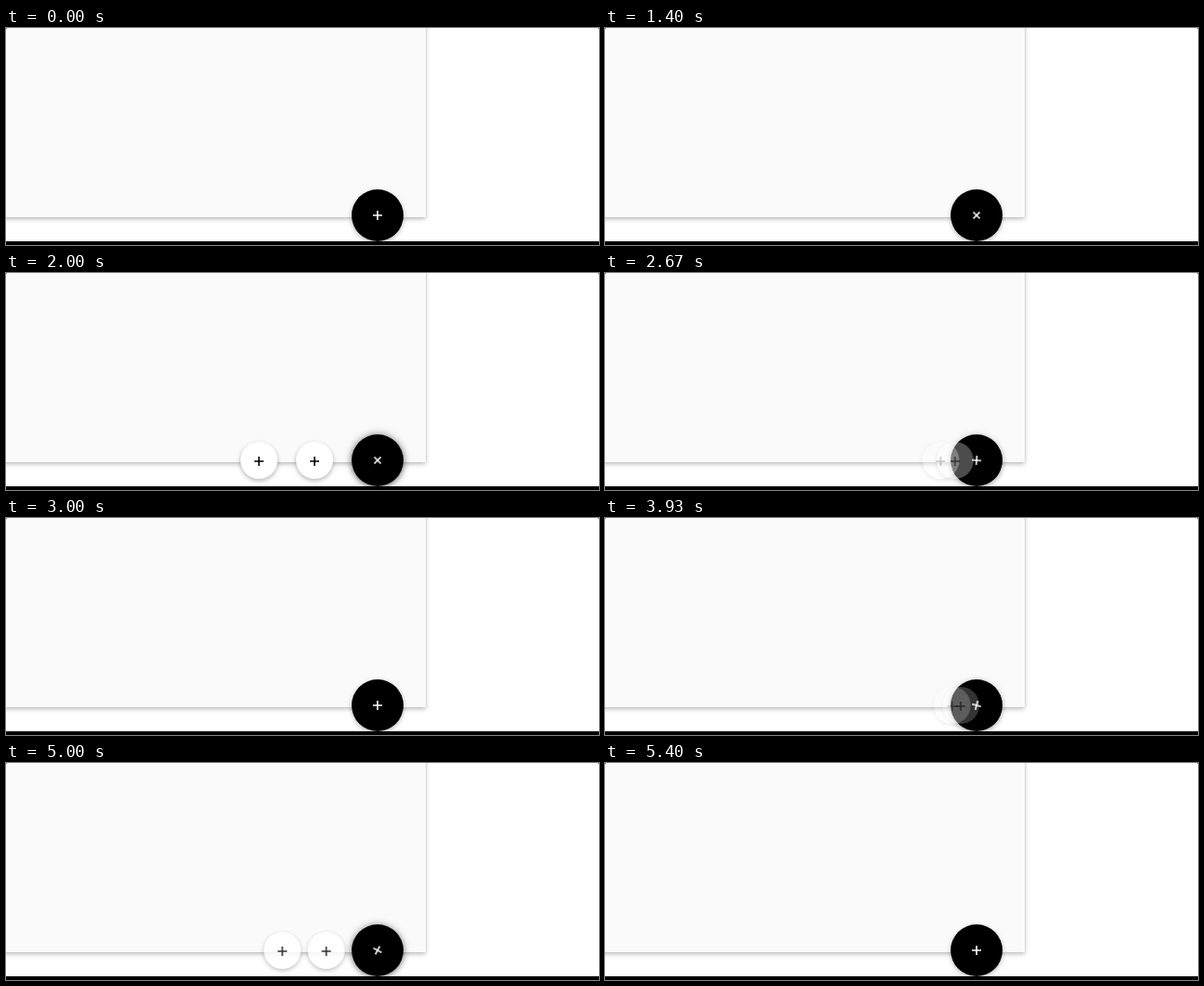
Recreate the animation shown at these times as an HTML page. Size 640 by 234 pixels, loop 6.59 s.

```html
<!DOCTYPE html>
<html lang="en">
<head>
<meta charset="utf-8">
<title>Speed dial</title>
<style>
  html, body { margin: 0; width: 100%; height: 100%; overflow: hidden; background: #fff; }
  .stage { position: absolute; left: 0; top: 0; width: 640px; height: 234px; overflow: hidden; background: #fff; }
  .stage * { position: absolute; }
  .panel { left: -10px; top: -10px; width: 463px; height: 214px; background: #fafafa;
    box-shadow: 0 2px 5px rgba(0, 0, 0, .26), 0 0 1px rgba(0, 0, 0, .2); }
  .floor { left: 0; top: 230px; width: 640px; height: 4px; background: #000; }
  .corner { top: 0; width: 2px; height: 2px; }
  .corner.l { left: 0; background: radial-gradient(circle at 100% 100%, transparent 1.8px, #000 2.4px); }
  .corner.r { right: 0; background: radial-gradient(circle at 0 100%, transparent 1.8px, #000 2.4px); }
  .fab, .halo { left: 373px; top: 174px; width: 56px; height: 56px; border-radius: 50%; }
  .fab { background: #000; box-shadow: 0 2px 5px rgba(0, 0, 0, .26); }
  .halo { box-shadow: 0 0 8px rgba(0, 0, 0, .45); opacity: 0; }
  .mini { top: 182px; width: 40px; height: 40px; border-radius: 50%; background: #fff;
    box-shadow: 0 2px 5px rgba(0, 0, 0, .3); opacity: 0; }
  .near { left: 313px; }
  .far { left: 253px; }
  svg { left: 50%; top: 50%; width: 16px; height: 16px; margin: -8px; }
  .mini svg { margin-top: -7px; }
  path { fill: none; stroke: #000; stroke-width: 1.6; }
  .fab path { stroke: #fff; }
</style>
</head>
<body>
<div class="stage">
  <div class="panel"></div>
  <div class="halo"></div>
  <div class="fab"><svg class="icon" viewBox="-8 -8 16 16"><path d="M-5 0H5M0-5V5"/></svg></div>
  <div class="mini far"><svg viewBox="-8 -8 16 16"><path d="M-5 0H5M0-5V5"/></svg></div>
  <div class="mini near"><svg viewBox="-8 -8 16 16"><path d="M-5 0H5M0-5V5"/></svg></div>
  <div class="floor"></div>
  <div class="corner l"></div>
  <div class="corner r"></div>
</div>
<script>
  const LOOP = 6590;
  const EASE_OUT = 'cubic-bezier(.25,.46,.45,.94)';

  // Each row: start, end, open after the move, easing
  const dialMoves = [
    [1450, 1950, true, EASE_OUT],
    [2485, 2935, false, 'ease'],
    [3875, 4375, true, EASE_OUT],
    [4930, 5380, false, 'ease']
  ];
  const iconMoves = [
    [1399, 1399, true, 'linear'],
    [2485, 2785, false, 'ease'],
    [3875, 4175, true, EASE_OUT],
    [4930, 5230, false, 'ease']
  ];

  function timeline(selector, moves, closed, open) {
    const frames = [{ ...closed, offset: 0 }];
    let pose = closed;
    for (const [start, end, opens, easing] of moves) {
      frames.push({ ...pose, offset: start / LOOP, easing });
      pose = opens ? open : closed;
      frames.push({ ...pose, offset: end / LOOP });
    }
    frames.push({ ...pose, offset: 1 });
    const animation = document.querySelector(selector).animate(frames, { duration: LOOP, fill: 'both' });
    animation.pause();
    return animation;
  }

  const mini = (selector, shift) => timeline(selector, dialMoves,
    { transform: `translateX(${shift}px)`, opacity: 0 },
    { transform: 'translateX(0px)', opacity: 1 });

  const animations = [
    mini('.near', 64),
    mini('.far', 128),
    timeline('.halo', dialMoves, { opacity: 0 }, { opacity: 1 }),
    timeline('.icon', iconMoves, { transform: 'rotate(0deg)' }, { transform: 'rotate(45deg)' })
  ];

  // The picture advances 15 times a second, on whole hundredths
  const tickTime = k => Math.round(k * 20 / 3) * 10;

  function draw() {
    const time = performance.now() % LOOP;
    let tick = Math.floor((time + 4) * 3 / 200);
    if (tickTime(tick) > time) tick--;
    for (const animation of animations) animation.currentTime = tickTime(tick);
    requestAnimationFrame(draw);
  }
  draw();
</script>
</body>
</html>
```
